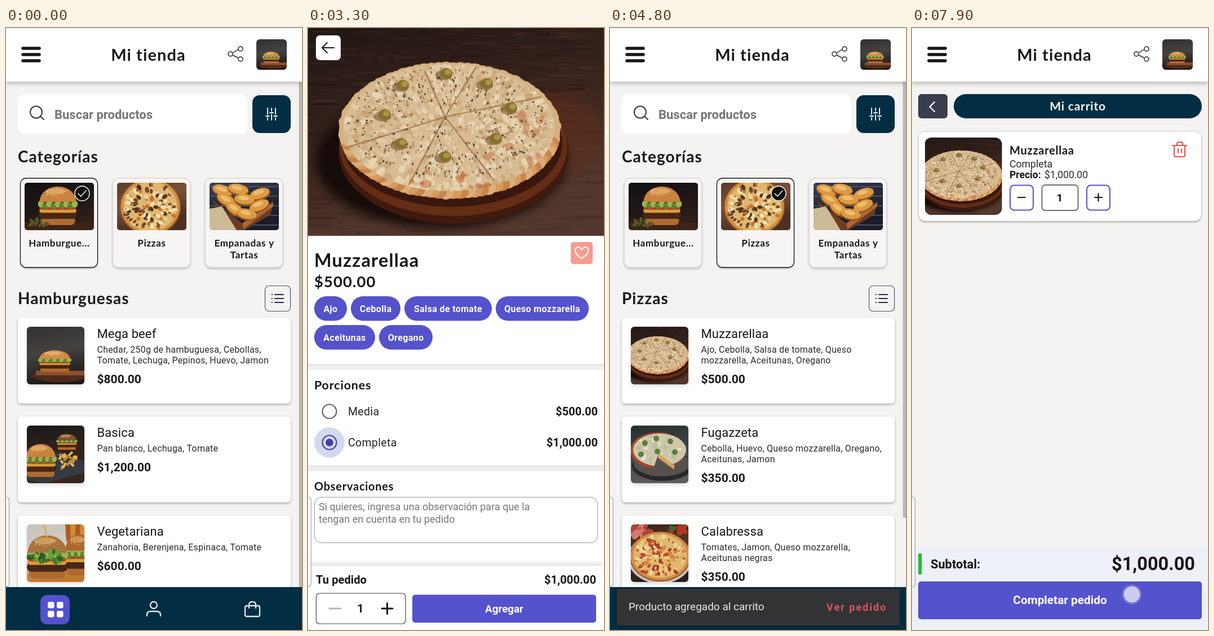
An HTML page with a canvas that plays this animation: 525 px wide and 1066 px high, repeating every 8000 ms.

```html
<!DOCTYPE html>
<html lang="es">
<head>
<meta charset="utf-8">
<title>Mi tienda</title>
<style>
html, body { margin: 0; width: 100%; height: 100%; overflow: hidden; background: #f5f3f1; }
canvas { display: block; }
</style>
</head>
<body>
<canvas id="stage" width="525" height="1066"></canvas>
<script>
const ctx = document.getElementById('stage').getContext('2d');
const NAVY = '#032d42', VIOLET = '#5452cc', INK = '#17171b', PAGE = '#f5f3f1';

// ---------- drawing helpers ----------
function box(x, y, w, h, r, fill, stroke, lw = 1, shadow) {
  ctx.save();
  ctx.beginPath();
  ctx.roundRect(x, y, w, h, r);
  if (shadow) {
    ctx.shadowColor = 'rgba(0,0,0,.3)';
    ctx.shadowBlur = shadow;
    ctx.shadowOffsetY = 2;
  }
  if (fill) { ctx.fillStyle = fill; ctx.fill(); }
  ctx.shadowColor = 'transparent';
  if (stroke) { ctx.strokeStyle = stroke; ctx.lineWidth = lw; ctx.stroke(); }
  ctx.restore();
}

function write(str, x, y, font, color, align, spacing) {
  ctx.font = font;
  ctx.fillStyle = color;
  ctx.textAlign = align;
  ctx.letterSpacing = spacing + 'px';
  ctx.fillText(str, x, y);
}
const heading = (s, x, y, size, color = INK, align = 'left') =>
  write(s, x, y, `700 ${size}px Lato, sans-serif`, color, align, size * 0.037);
const text = (s, x, y, size, color = INK, weight = 400, align = 'left', spacing = 0) =>
  write(s, x, y, `${weight} ${size}px Roboto, sans-serif`, color, align, spacing);

function icon(d, color, lw) {
  ctx.lineWidth = lw;
  ctx.lineCap = ctx.lineJoin = 'round';
  ctx.strokeStyle = color;
  ctx.stroke(new Path2D(d));
}

function disc(g, x, y, r, fill, ry = r, turn = 0) {
  g.fillStyle = fill;
  g.beginPath();
  g.ellipse(x, y, r, ry, turn, 0, 7);
  g.fill();
}

function shape(g, fill, ...pts) {
  g.fillStyle = fill;
  g.beginPath();
  pts.forEach(([x, y]) => g.lineTo(x, y));
  g.fill();
}

function backdrop(g, w, h, ...tones) {
  const grad = g.createLinearGradient(0, 0, w * 0.2, h);
  tones.forEach((c, i) => grad.addColorStop(i / (tones.length - 1), c));
  g.fillStyle = grad;
  g.fillRect(0, 0, w, h);
}

// ---------- food pictures ----------
function random(seed) {
  return () => (seed = (seed * 16807) % 2147483647) / 2147483647;
}

function sprinkle(g, n, cx, cy, rx, ry, colors, size, seed) {
  const rnd = random(seed * 7919);
  for (let i = 0; i < n; i++) {
    const a = rnd() * 2 * Math.PI, d = Math.sqrt(rnd()), s = size * (0.4 + rnd());
    disc(g, cx + Math.cos(a) * d * rx, cy + Math.sin(a) * d * ry, s, colors[i % colors.length], s * 0.65, a);
  }
}

function picture(w, h, draw) {
  const c = document.createElement('canvas');
  c.width = w;
  c.height = h;
  draw(c.getContext('2d'), w, h);
  return c;
}

function burger(g, x, y, w, h, bun = '#c9823f') {
  const at = (fx, fy) => [x + w * fx, y + h * fy];
  const layer = (fy, fh, color, inset = 0) => {
    g.fillStyle = color;
    g.beginPath();
    g.roundRect(x + inset * w, y + h * fy, w * (1 - 2 * inset), h * fh, h * fh / 2);
    g.fill();
  };
  layer(0.78, 0.22, '#b06a30', 0.05);
  layer(0.62, 0.22, '#47261a');
  layer(0.56, 0.12, '#dc9d35', 0.02);
  layer(0.48, 0.12, '#b53b2b', 0.03);
  for (let i = 0; i < 9; i++) disc(g, ...at(0.06 + i * 0.11, 0.45 + (i % 2) * 0.05), w * 0.08, i % 2 ? '#5d822f' : '#9bb64e', h * 0.09);
  g.fillStyle = bun;
  g.beginPath();
  g.moveTo(...at(0.02, 0.4));
  g.bezierCurveTo(...at(0.05, -0.14), ...at(0.95, -0.14), ...at(0.98, 0.4));
  g.fill();
  disc(g, ...at(0.45, 0.12), w * 0.26, 'rgba(255,214,150,.4)', h * 0.08);
  sprinkle(g, 26, ...at(0.5, 0.17), w * 0.33, h * 0.11, ['#f0d5a0'], w * 0.013, 9);
}

const muzza = picture(525, 368, (g, w, h) => {
  backdrop(g, w, h, '#211816', '#35211b', '#52372c');
  const rnd = random(31);
  for (let i = 0; i < 420; i++) {
    g.fillStyle = i % 2 ? 'rgba(12,7,6,.13)' : 'rgba(135,88,66,.1)';
    g.fillRect(rnd() * w - 30, rnd() * h, 12 + rnd() * 60, 1 + rnd() * 4);
  }
  g.filter = 'blur(9px)';
  disc(g, 442, 190, 76, 'rgba(98,44,24,.5)', 72);
  disc(g, 235, 236, 222, '#160c0a', 118);
  g.filter = 'none';
  disc(g, 258, 219, 204, '#3f1a0d', 128);
  disc(g, 258, 211, 202, '#632d16', 122);
  disc(g, 256, 205, 195, '#3a170c', 112);

  // Uneven crust: a ring of overlapping lumps around the base
  for (let i = 0; i < 90; i++) {
    const a = i / 90 * 2 * Math.PI, low = Math.sin(a);
    disc(g, 251 + Math.cos(a) * 183, 182 + low * 109, 13 + rnd() * 3,
      low > 0.2 ? ['#c8854a', '#d59b5f', '#dcae78'][i % 3] : '#d6b181', 11 + rnd() * 2);
  }
  g.save();
  g.beginPath();
  g.ellipse(250, 177, 187, 112, 0, 0, 7);
  g.clip();
  g.fillStyle = '#d7bb92';
  g.fillRect(0, 0, w, h);
  sprinkle(g, 750, 250, 177, 190, 114, ['#e2cca7', '#cda97c', '#e7d5b5', '#d2ae84', '#dcc5a2'], 6, 17);
  sprinkle(g, 26, 375, 205, 64, 52, ['rgba(190,88,50,.4)', '#e5d0ac'], 9, 23);
  sprinkle(g, 30, 250, 276, 95, 18, ['rgba(190,84,44,.45)', '#e5d0ac'], 8, 29);
  g.strokeStyle = 'rgba(139,88,52,.6)';
  g.lineWidth = 2.6;
  for (const [x, y] of [[207, 77], [300, 67], [421, 121], [330, 270], [179, 278], [66, 213]]) {
    g.beginPath();
    g.moveTo(243, 158);
    g.lineTo(x, y);
    g.stroke();
  }
  sprinkle(g, 620, 246, 168, 176, 98, ['#75603f', '#94734b', '#564931', '#ad8960'], 2, 5);
  g.restore();
  for (const [x, y] of [[168, 102], [245, 81], [317, 99], [360, 142], [333, 196], [243, 228], [165, 205], [136, 154]]) {
    disc(g, x - 4, y + 3, 15, 'rgba(95,62,30,.5)', 9);
    disc(g, x, y, 11, '#85702f', 9.5);
    disc(g, x + 3, y - 2, 6, '#ab9444', 5);
  }
});

const mega = picture(102, 102, (g, w, h) => {
  backdrop(g, w, h, '#30302f', '#454340', '#1d1a19');
  disc(g, 58, 87, 48, '#512b1a', 11);
  g.fillStyle = '#8a5130';
  g.fillRect(16, 78, 86, 8);
  burger(g, 21, 42, 57, 38, '#d08a49');
});

const basica = picture(102, 102, (g, w, h) => {
  backdrop(g, w, h, '#191819', '#30231d', '#38251b');
  burger(g, 53, 15, 36, 28, '#80502d');
  shape(g, '#353a43', [0, 74], [60, 46], [102, 64], [102, 84], [30, 102], [0, 96]);
  g.lineWidth = 4;
  const rnd = random(12 * 7919);
  for (let i = 0; i < 24; i++) {
    const x = 57 + rnd() * 32, y = 50 + rnd() * 20;
    g.strokeStyle = i % 2 ? '#e5b955' : '#c58b32';
    g.beginPath();
    g.moveTo(x, y);
    g.lineTo(x + rnd() * 16 - 8, y + 10 - rnd() * 18);
    g.stroke();
  }
  burger(g, -3, 33, 55, 58);
});

const veggie = picture(102, 102, (g, w, h) => {
  backdrop(g, w, h, '#c5c3bf', '#d7cec2', '#bd772f');
  for (let i = 0; i < 4; i++) shape(g, i % 2 ? '#d28a34' : '#a95d23', [68 + i * 9, 0], [77 + i * 9, 0], [82 + i * 7, 28], [70 + i * 8, 30]);
  burger(g, 67, 18, 52, 72, '#ae682d');
  burger(g, 0, 20, 72, 76, '#a9743a');
  sprinkle(g, 34, 37, 57, 35, 9, ['#3f7a2c', '#6f9f40', '#2f5a24'], 5, 3);
  shape(g, '#d9ad69', [28, 0], [32, 0], [37, 22], [34, 22]);
});

const burgers = picture(123, 84, (g, w, h) => {
  backdrop(g, w, h, '#131114', '#1d1515', '#2d1e16');
  g.fillStyle = '#3b2518';
  g.fillRect(0, 70, w, 14);
  burger(g, 25, 7, 68, 68);
  sprinkle(g, 30, 26, 71, 24, 6, ['#46602a', '#6a4a24'], 3, 4);
});

function roundPizza(g, cx, cy, rx, ry, tones, seed) {
  disc(g, cx, cy, rx, '#9a5526', ry);
  disc(g, cx, cy - 1, rx * 0.97, '#cf8f45', ry * 0.97);
  disc(g, cx, cy - 1, rx * 0.88, '#dfb76d', ry * 0.88);
  sprinkle(g, 150, cx, cy, rx * 0.84, ry * 0.84, tones, 4, seed);
}

const pizzas = picture(123, 84, (g, w, h) => {
  backdrop(g, w, h, '#5d3c2b', '#7a5138', '#4d3022');
  roundPizza(g, 59, 43, 54, 50, ['#ecd49b', '#74492a', '#c7742f', '#f1dfae', '#513322'], 8);
});

const empanadas = picture(123, 84, (g, w, h) => {
  backdrop(g, w, h, '#3b4052', '#262a38', '#1b1d28');
  g.fillStyle = '#565b70';
  for (let y = 6; y < h; y += 17) g.fillRect(0, y, w, 1.5);
  shape(g, '#6d3d20', [4, 30], [58, 72], [113, 37], [108, 56], [62, 84], [40, 84]);
  shape(g, '#a9683a', [58, 72], [113, 34], [113, 42], [60, 82]);
  for (const [x, y, t] of [[23, 13, .3], [51, 11, .2], [89, 19, -.3], [30, 30, .5], [62, 29, .1], [88, 40, -.4], [45, 46, .6], [66, 55, .2]]) {
    disc(g, x, y + 2, 19, '#9a551c', 10, t);
    disc(g, x, y, 18, '#dc9a43', 9, t);
    disc(g, x - 2, y - 2, 10, '#edbd6d', 4, t);
  }
  shape(g, '#cdbb97', [0, 46], [22, 42], [48, 84], [0, 84]);
});

const fugazzeta = picture(102, 102, (g, w, h) => {
  backdrop(g, w, h, '#24302b', '#3e4247', '#5e5b59');
  disc(g, 56, 71, 54, '#29282a', 27);
  disc(g, 55, 67, 50, '#56514d', 23);
  disc(g, 48, 44, 49, '#a6452a', 32);
  disc(g, 51, 43, 47, '#cbc7ab', 29);
  sprinkle(g, 60, 50, 42, 43, 24, ['#e5e2cf', '#b6bf98', '#d9c99d'], 4, 6);
  shape(g, '#56514d', [49, 50], [77, 76], [35, 90]);
  shape(g, '#d3a35c', [49, 50], [77, 70], [77, 78], [48, 57]);
  for (const [x, y] of [[25, 31], [45, 23], [70, 28], [18, 51], [47, 46], [78, 47]]) disc(g, x, y, 5, '#607a37');
});

const calabressa = picture(102, 102, (g, w, h) => {
  backdrop(g, w, h, '#3c211a', '#5a3425', '#29201d');
  sprinkle(g, 20, 17, 9, 22, 10, ['#b3423a', '#d27a6b'], 7, 2);
  sprinkle(g, 18, 83, 8, 20, 8, ['#45642c', '#b83524'], 5, 7);
  disc(g, 52, 60, 57, '#c7c4bd', 45);
  roundPizza(g, 52, 57, 54, 44, ['#bd4b2d', '#ecc981', '#d78542', '#a43a28', '#f0d69d'], 11);
});

function photo(img, x, y, w, h, r) {
  const k = Math.max(w / img.width, h / img.height), sw = w / k, sh = h / k;
  ctx.save();
  ctx.beginPath();
  ctx.roundRect(x, y, w, h, r);
  ctx.clip();
  ctx.drawImage(img, (img.width - sw) / 2, (img.height - sh) / 2, sw, sh, x, y, w, h);
  ctx.restore();
}

// ---------- shop data ----------
const categories = [[burgers, 'Hamburgue...'], [pizzas, 'Pizzas'], [empanadas, 'Empanadas y', 'Tartas']];
const menus = [
  { title: 'Hamburguesas', bar: 990, items: [
    [mega, 'Mega beef', '$800.00', 'Chedar, 250g de hambuguesa, Cebollas,', 'Tomate, Lechuga, Pepinos, Huevo, Jamon'],
    [basica, 'Basica', '$1,200.00', 'Pan blanco, Lechuga, Tomate'],
    [veggie, 'Vegetariana', '$600.00', 'Zanahoria, Berenjena, Espinaca, Tomate']] },
  { title: 'Pizzas', bar: 867, items: [
    [muzza, 'Muzzarellaa', '$500.00', 'Ajo, Cebolla, Salsa de tomate, Queso', 'mozzarella, Aceitunas, Oregano'],
    [fugazzeta, 'Fugazzeta', '$350.00', 'Cebolla, Huevo, Queso mozzarella, Oregano,', 'Aceitunas, Jamon'],
    [calabressa, 'Calabressa', '$350.00', 'Tomates, Jamon, Queso mozzarella,', 'Aceitunas negras']] }
];
const chips = [['Ajo', 11, 475, 58], ['Cebolla', 76, 475, 88], ['Salsa de tomate', 171, 475, 155],
  ['Queso mozzarella', 333, 475, 165], ['Aceitunas', 11, 526, 108], ['Oregano', 126, 526, 95]];

// ---------- screens ----------
function header(shadow) {
  box(0, 0, 525, 95, 0, '#fff', null, 1, shadow);
  box(0, 0, 525, 2, 0, '#eaf5f8');
  icon('M30 36H59M30 47H59M30 58H59', INK, 5.5);
  heading('Mi tienda', 252.5, 58, 29, INK, 'center');
  icon('M402 44 412 38M402 48 412 53M402 46a4 4 0 1 1-8 0a4 4 0 1 1 8 0M420 37a4 4 0 1 1-8 0a4 4 0 1 1 8 0M420 55a4 4 0 1 1-8 0a4 4 0 1 1 8 0', '#55555a', 2);
  photo(mega, 444, 20, 54, 54, 6);
}

function navBar() {
  box(0, 990, 525, 76, 0, NAVY);
  box(61, 1004, 52, 52, 12, VIOLET);
  for (const x of [74, 90]) for (const y of [1016, 1032]) box(x, y, 11.5, 11.5, 3, '#fff');
  icon('M268 1022a6 6 0 1 1-12 0a6 6 0 1 1 12 0M250 1041v-2q0-6 7-6h10q7 0 7 6v2', '#e3e8ee', 2.3);
  icon('M428 1023h19q3 0 3 3v13q0 3-3 3h-20q-3 0-3-3v-13q0-3 4-3M431 1027v-5q0-6 6-6t6 6v5', '#e3e8ee', 2.3);
}

function snackbar() {
  box(12, 993, 502, 65, 4, '#333335', null, 1, 6);
  text('Producto agregado al carrito', 33, 1031, 19, '#e9e9e9');
  text('Ver pedido', 384, 1032, 18, '#d9565f', 700, 'left', 2);
}

function menuScreen(selected) {
  const menu = menus[selected];
  box(0, 0, 525, 1066, 0, PAGE);
  box(21, 117, 407, 71, 13, '#fff');
  icon('M64 149a10.5 10.5 0 1 1-21 0a10.5 10.5 0 1 1 21 0M61 156.5 67 162', '#333', 2);
  text('Buscar productos', 86, 161, 22, '#757575', 600);
  box(437, 119, 68, 67, 13, NAVY);
  icon('M464 142V153M464 159V163M461 156H467M471 142V147M471 153V163M468 150H474M478 142V153M478 159V163M475 156H481', '#fff', 1.8);
  heading('Categorías', 21, 238, 28);

  categories.forEach(([img, ...label], i) => {
    const x = 25.5 + i * 164, on = i === selected;
    box(x, 266, 137, 158, 10, '#f7f5f4', on ? '#17171b' : '#dedbd9', 1.3, on ? 3 : 4);
    photo(img, x + 7.5, 274, 123, 84, 5);
    label.forEach((s, n) => heading(s, x + 69, 387 + n * 21, 17, INK, 'center'));
    if (!on) return;
    disc(ctx, x + 109.5, 293, 13, '#111');
    icon(`M${x + 122.5} 293a13 13 0 1 1-26 0a13 13 0 1 1 26 0M${x + 102.5} 293l5 5 9-10`, '#fff', 1.4);
  });

  heading(menu.title, 21, 489, 28);
  box(459.5, 456.5, 45, 45, 7, null, '#4d5274', 1.2);
  icon('M477 472H492M477 479H492M477 486H492M471.5 472h.5M471.5 479h.5M471.5 486h.5', '#252a51', 2);

  menu.items.forEach(([img, name, price, ...lines], i) => {
    const y = 513 + i * 175;
    box(21, y, 484, 152, 6, '#fff', null, 1, 4);
    ctx.save();
    ctx.globalAlpha = 0.6;
    box(38, y + 18, 100, 100, 6, '#999', null, 1, 8);
    ctx.restore();
    photo(img, 37, y + 16, 102, 102, 6);
    text(name, 161.5, y + 36, 22, INK, 400, 'left', 0.1);
    lines.forEach((s, n) => text(s, 161.5, y + 62 + n * 19, 16, '#2b2b2e', 400, 'left', 0.22));
    text(price, 161.5, y + 97 + lines.length * 19 - 19, 21, INK, 700);
  });

  box(519.5, 95, 5.5, menu.bar - 95, 0, '#b9b8b8');
  header(9);
  navBar();
}

function radio(y, on, halo) {
  const color = on > 0.5 ? '#4340a6' : '#66616e';
  if (halo) disc(ctx, 38, y, 27, `rgba(72,100,180,${halo})`);
  icon(`M50.5 ${y}a12.5 12.5 0 1 1-25 0a12.5 12.5 0 1 1 25 0`, color, 2.2);
  if (on) disc(ctx, 38, y, 7.2 * on, color);
}

function detailScreen(t, top) {
  const grow = Math.min(1, Math.max(0, (t - 3150) / 160));
  const total = t < 3200 ? '$500.00' : '$1,000.00';
  const halo = grow * (0.25 - 0.15 * Math.min(1, Math.max(0, (t - 3700) / 300)));
  box(0, 0, 525, 1066, 0, '#fff');
  ctx.save();
  ctx.translate(0, top);
  ctx.drawImage(muzza, 0, -1, 525, 369);
  if (!top) {
    box(14, 13, 44, 44, 7, '#fff');
    icon('M46 35H25M34 26 25 35 34 44', INK, 2);
  }
  box(466, 379, 39, 39, 5, '#f89b91');
  icon('M485.5 408C469 398 473 387 480 388Q484 389 485.5 393Q487 389 491 388C498 387 502 398 485.5 408', '#fff', 2);
  heading('Muzzarellaa', 11, 423, 32.5);
  heading('$500.00', 11, 459, 27.5);
  for (const [label, x, y, w] of chips) {
    box(x, y, w, 43.5, 22, VIOLET);
    text(label, x + w / 2, y + 27.5, 16, '#fff', 600, 'center', 0.35);
  }
  for (const y of [595, 775]) {
    box(0, y, 525, 10, 0, '#f0eff0');
    box(0, y, 525, 2, 0, '#e2e1e2');
  }
  heading('Porciones', 11, 640, 21.5);
  radio(679, 1 - grow, 0);
  radio(734, grow, halo);
  text('Media', 71, 686, 19.5, '#26262a', 400, 'left', 0.35);
  text('Completa', 71, 741, 19.5, '#26262a', 400, 'left', 0.35);
  text('$500.00', 514, 686, 20, INK, 700, 'right');
  text('$1,000.00', 514, 741, 20, INK, 700, 'right');
  heading('Observaciones', 11, 819, 20);
  box(11.5, 831, 502, 80.5, 12, '#fff', '#929292');
  text('Si quieres, ingresa una observación para que la', 19, 854, 18, '#77777a');
  text('tengan en cuenta en tu pedido', 19, 876, 18, '#77777a');
  ctx.restore();

  box(0, 952, 525, 120, 0, '#fff', null, 1, 14);
  text('Tu pedido', 14, 984, 20.2, INK, 700);
  text(total, 511, 984, 20.2, INK, 700, 'right');
  box(14.5, 1001, 158.5, 54, 6, '#fff', '#45454a', 1.2);
  icon('M38 1028H58', '#b3b3b6', 3);
  icon('M131 1028H150M140.5 1018.5V1037.5', INK, 3);
  text('1', 93, 1035, 20, INK, 700, 'center');
  box(185, 1003.5, 326, 49.5, 5, VIOLET);
  text('Agregar', 348, 1034.5, 18.8, '#fff', 700, 'center');
  if (!top) return;
  box(519.5, 95, 5.5, 895, 0, '#c9c8c9');
  header(0);
  navBar();
}

function cartScreen() {
  box(0, 0, 525, 1066, 0, PAGE);
  header(9);
  box(11, 117, 52, 43, 6, '#393d4d');
  icon('M40 131 31.5 139.5 40 148', '#fff', 2.4);
  box(74, 117, 440, 43, 21.5, NAVY);
  heading('Mi carrito', 294, 146, 21, '#f4f7f8', 'center');
  box(11.5, 183, 502, 159, 12, '#fff', '#d2d0cf', 1, 3);
  photo(muzza, 22.5, 194, 137, 137, 12);
  heading('Muzzarellaa', 173, 224, 20);
  text('Completa', 173, 246.5, 17.7, '#2b2b2e');
  text('Precio:', 173, 265.5, 17.5, INK, 700);
  text('$1,000.00', 312, 265.5, 17.5, '#2b2b2e', 400, 'right');
  box(174, 278.5, 41, 44, 7, '#fff', VIOLET, 2);
  box(230.5, 278, 64, 45, 6, '#fff', '#6c6c70', 2);
  box(310, 278.5, 41, 44, 7, '#fff', VIOLET, 2);
  icon('M188 300H201M324 300H337M330.5 293.5V306.5', INK, 2.2);
  text('1', 262, 306.5, 19, INK, 700, 'center');
  icon('M462 208H487M470 207V205Q470 202 473 202H477Q480 202 480 205V207M465 209V225Q465 228 468 228H481Q484 228 484 225V209M472 214V221M478 214V221', '#dc5a50', 2.2);
  box(0, 920, 525, 146, 0, '#edf0f7');
  box(11, 930, 6.5, 38, 3, '#2db83d');
  text('Subtotal:', 33, 956.5, 21.8, INK, 700);
  text('$1,000.00', 502, 960, 32.5, INK, 700, 'right');
  box(11, 980, 503, 67, 5, VIOLET);
  text('Completar pedido', 262.5, 1020, 20.8, '#fff', 700, 'center');
}

// Taps: start, end, x, y
const taps = [[780, 980, 262, 345], [1750, 1950, 290, 585], [3000, 3180, 40, 734],
  [3950, 4150, 360, 1028], [5450, 5650, 437, 1026], [7750, 8000, 390, 1003]];

function render(t) {
  if (t < 1000) menuScreen(0);
  else if (t < 2000) menuScreen(1);
  else if (t < 4300) detailScreen(t, 0);
  else if (t < 4500) detailScreen(t, 96);
  else if (t < 5700) menuScreen(1);
  else cartScreen();
  if (t >= 4300 && t < 5700) snackbar();
  box(-12, 830.5, 17.5, 159, 6, 'rgba(255,255,255,.35)', '#a5a5a8', 1.2);
  for (const [from, to, x, y] of taps) {
    if (t < from || t >= to) continue;
    disc(ctx, x, y, 18, 'rgba(170,170,220,.3)');
    disc(ctx, x, y, 14.5, 'rgba(228,228,246,.8)');
  }
}

function tick(now) {
  render(now % 8000);
  requestAnimationFrame(tick);
}
requestAnimationFrame(tick);
</script>
</body>
</html>
```
